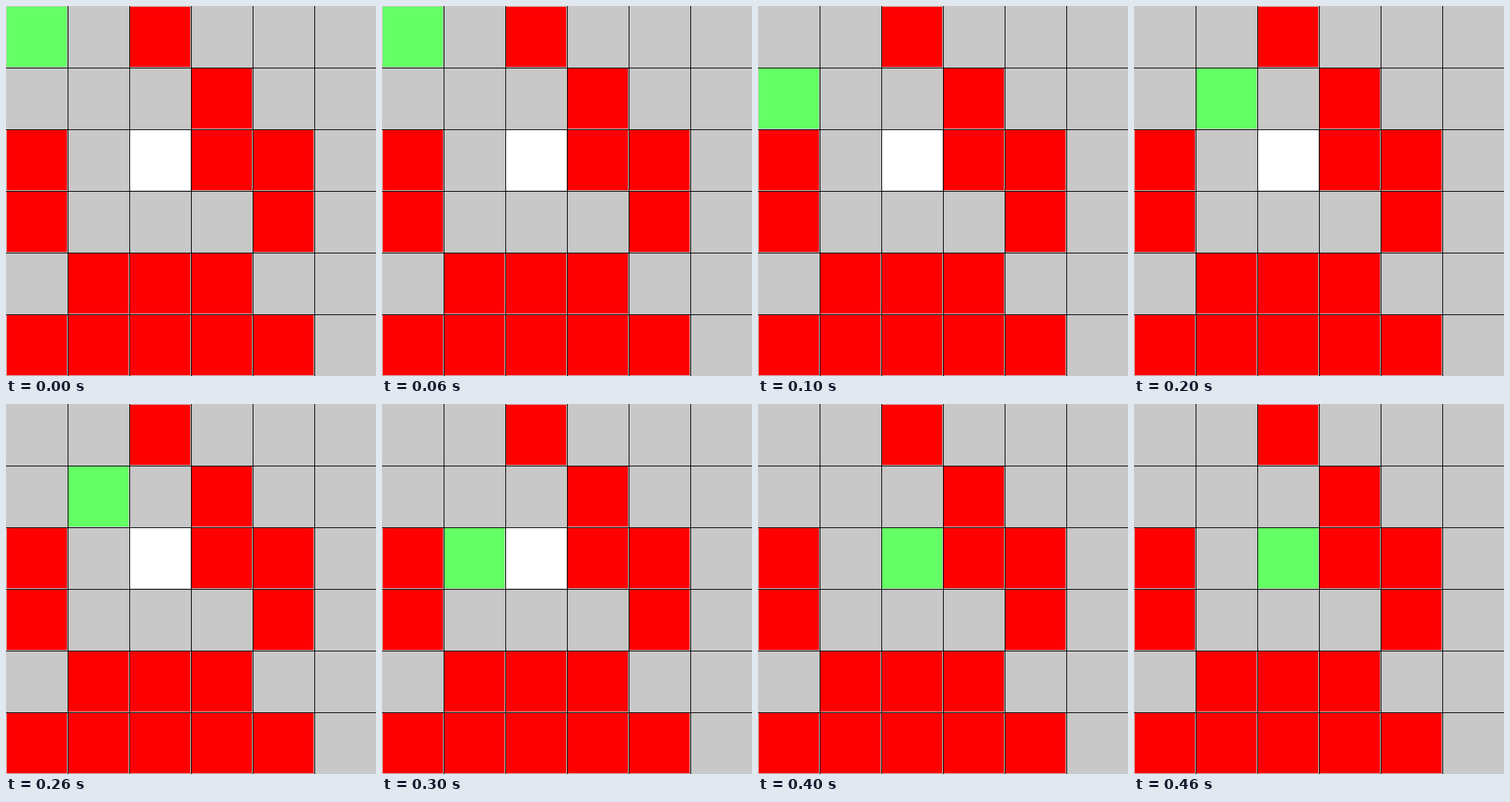
An HTML page with a canvas for the animation above (0.5 s loop, 498x498 px).

```html
<!DOCTYPE html>
<html lang="en">
<head>
<meta charset="utf-8">
<title>Grid walk</title>
<style>
  html, body { margin: 0; width: 100%; height: 100%; overflow: hidden; }
  canvas { display: block; }
</style>
</head>
<body>
<canvas id="stage" width="498" height="498"></canvas>
<script>
const SIZE = 498, CELL = 83, STEP_MS = 100;
const FLOOR = '#c8c8c8', LINE = '#000', WALL = '#f00', GOAL = '#fff', WALKER = '#64ff64';

const maze = [
  '..#...',
  '...#..',
  '#.G##.',
  '#...#.',
  '.###..',
  '#####.'
];
const path = [[0, 0], [0, 1], [1, 1], [1, 2], [2, 2]];
const ctx = document.getElementById('stage').getContext('2d');

function fillCell(col, row, color) {
  ctx.fillStyle = color;
  ctx.fillRect(col * CELL + 1, row * CELL + 1, CELL - 2, CELL - 2);
}

function draw(time) {
  ctx.fillStyle = FLOOR;
  ctx.fillRect(0, 0, SIZE, SIZE);

  ctx.fillStyle = LINE;
  for (let p = CELL; p < SIZE; p += CELL) {
    ctx.fillRect(p, 0, 1, SIZE);
    ctx.fillRect(0, p, SIZE, 1);
  }

  maze.forEach((cells, row) => [...cells].forEach((cell, col) => {
    if (cell !== '.') fillCell(col, row, cell === '#' ? WALL : GOAL);
  }));

  const [col, row] = path[Math.floor(time / STEP_MS) % path.length];
  fillCell(col, row, WALKER);
}

const start = performance.now();
function tick() {
  draw(performance.now() - start);
  requestAnimationFrame(tick);
}
tick();
</script>
</body>
</html>
```
